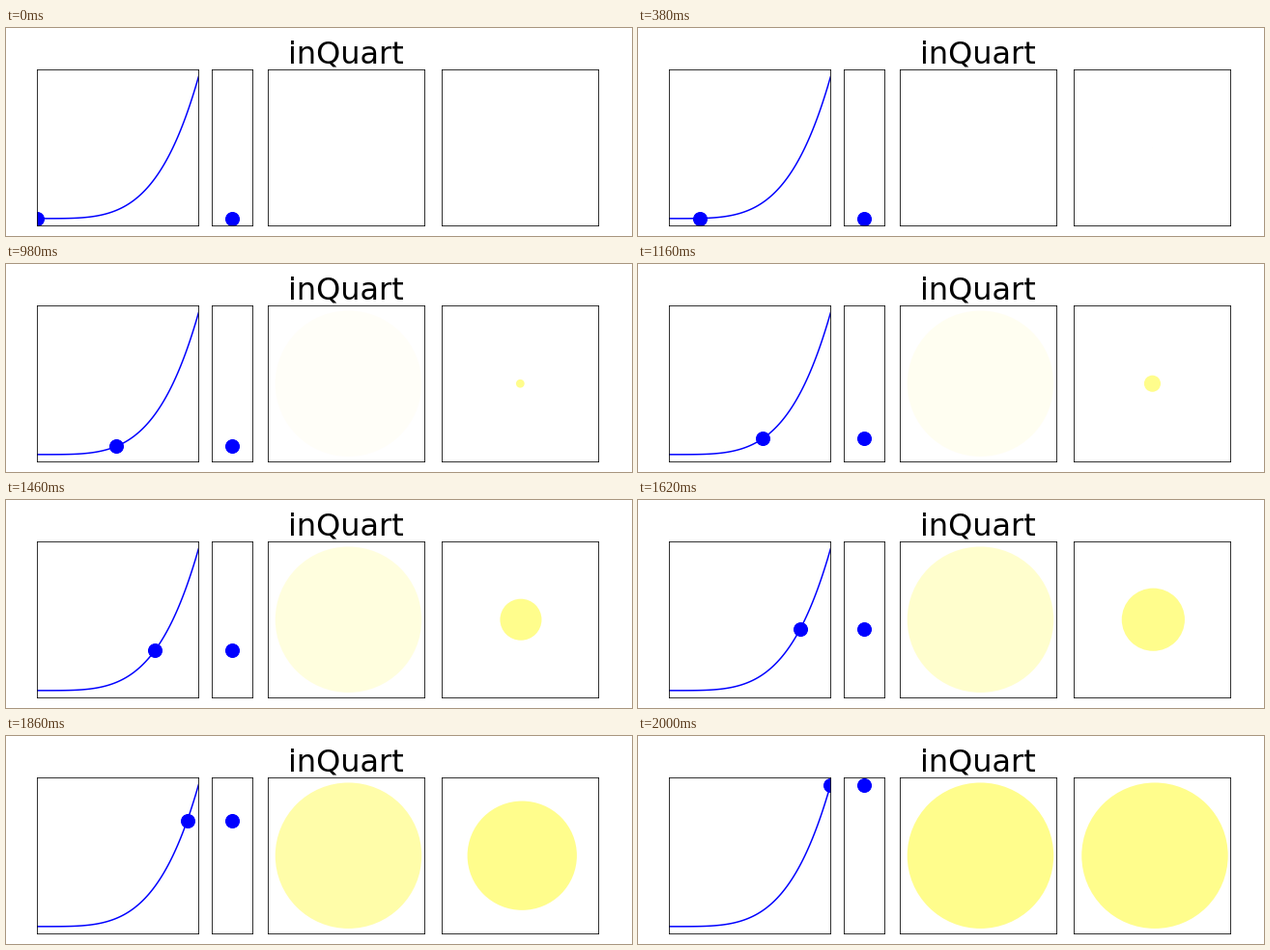
Write a matplotlib script that moves like this. It is 648x216 px and loops after 2020 ms.

```python
import matplotlib.pyplot as plt
import numpy as np
from matplotlib.animation import FuncAnimation
from matplotlib.patches import Circle

FRAMES = 101
INTERVAL = 20
YELLOW = "#fffd8c"
CENTER = np.array([0.035, 0.0])
RADIUS = 0.935


def in_quart(t):
    return t ** 4


def add_badge(ax):
    ax.set(xlim=(-1, 1), ylim=(-1, 1), aspect="equal")
    return ax.add_patch(Circle(CENTER, RADIUS, facecolor=YELLOW, linewidth=0))


def add_dot(ax):
    return ax.plot([], [], "o", color="blue", markersize=14)[0]


fig = plt.figure(figsize=(9, 3), dpi=72, facecolor="white")
grid = fig.add_gridspec(1, 4, width_ratios=[4, 1, 4, 4], wspace=0.1,
                        left=0.05, right=0.95, bottom=0.05, top=0.8)
curve_ax, slide_ax, fade_ax, zoom_ax = axes = [fig.add_subplot(g) for g in grid]
for ax in axes:
    ax.set(xticks=[], yticks=[])

curve_ax.set(xlim=(0, 1), ylim=(-0.05, 1.05))
slide_ax.set(xlim=(-1, 1), ylim=(-0.05, 1.05))
fade_ax.set_title("inQuart", fontsize=32, fontfamily="DejaVu Sans")

ts = np.linspace(0, 1, FRAMES)
curve_ax.plot(ts, in_quart(ts), color="blue", linewidth=1.5)
curve_dot = add_dot(curve_ax)
slide_dot = add_dot(slide_ax)
fade_badge = add_badge(fade_ax)
zoom_badge = add_badge(zoom_ax)


def update(i):
    t = i / (FRAMES - 1)
    v = in_quart(t)
    curve_dot.set_data([t], [v])
    slide_dot.set_data([0], [v])
    fade_badge.set_alpha(v)
    zoom_badge.set_center(CENTER * v)
    zoom_badge.set_radius(RADIUS * v)
    zoom_badge.set_visible(v > 0)
    return curve_dot, slide_dot, fade_badge, zoom_badge


anim = FuncAnimation(fig, update, frames=FRAMES, interval=INTERVAL,
                     repeat=True, repeat_delay=0)
plt.show()
```
